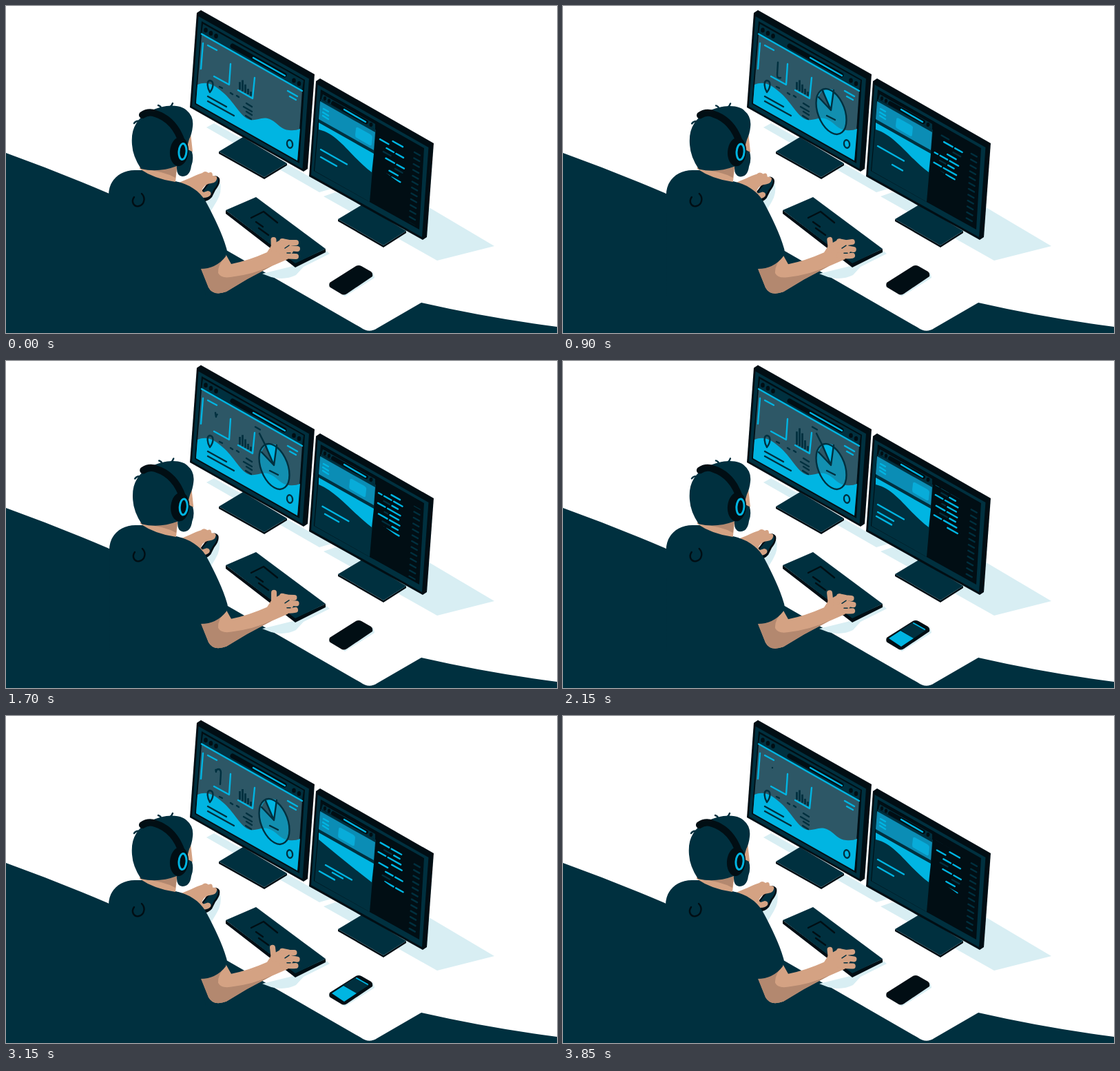
Animation, 800 px wide and 474 px high, one loop 3900 ms. Source, as an HTML page:

```html
<!DOCTYPE html>
<html lang="en">
<head>
<meta charset="utf-8">
<title>Developer at a desk</title>
<style>
html, body { margin: 0; width: 100%; height: 100%; overflow: hidden; background: #fff; }
svg { display: block; width: 800px; height: 474px; }
.navy { fill: #00303f; }
.black { fill: #010e14; }
.cyan { fill: #00b5e2; }
.shade { fill: #d8eef3; }
.skin { fill: #d4a283; }
.dim { fill: #b3886f; }
.ln { fill: none; stroke-width: 2.4; stroke-linecap: round; stroke-linejoin: round; }
.c { stroke: #00b5e2; }
.n { stroke: #00303f; }
.b { stroke: #010e14; }
.finger { fill: none; stroke: #d4a283; stroke-width: 8; stroke-linecap: round; }
</style>
</head>
<body>
<svg viewBox="0 0 800 474">
  <defs>
    <clipPath id="rowClip"><path d="M536 177L584 205 584 266 532 227Z"/></clipPath>
    <clipPath id="sideClip"><path d="M584 205L606 217 602 322 580 310Z"/></clipPath>
  </defs>

  <!-- shadows -->
  <path class="shade" d="M291 176L302 170 472 265 455 270Z"/>
  <path class="shade" d="M461 276L478 270 616 293 709 348 626 369Z"/>

  <!-- desk edge -->
  <path class="navy" d="M0 213Q75 240 150 272L320 354 515 466Q527 475 539 467L603 430Q700 452 800 465V474H0Z"/>

  <!-- stands -->
  <path class="black" d="M309 211L375 248 408 228V231L375 251 309 214Z"/>
  <path class="navy" d="M309 211L344 190 408 228 375 248Z"/>
  <path class="black" d="M482 309L548 347 581 326V329L548 350 482 312Z"/>
  <path class="navy" d="M482 309L517 288 581 326 548 347Z"/>

  <!-- left monitor -->
  <path class="black" d="M277 10L283 6 448 99 438 236 432 240 267 147Z"/>
  <path class="navy" d="M279.500 15L440 105.500 430.500 236 270 145.500Z"/>
  <path class="black" d="M284 22L434 107 426 228 274 142Z"/>
  <path class="navy" d="M286 26L432 108 430 122 284 40Z"/>
  <path fill="#2d5766" d="M284 41L430 123 423 224 276 141Z"/>
  <path class="cyan" d="M278 114C292 108 303 114 317 127C333 142 340 159 352 164C363 169 371 158 385 165C395 170 400 180 411 180Q420 181 427 178L423 224 276 141Z"/>
  <path class="ln c" d="M284 40.500L430 123"/>
  <g class="black">
    <ellipse cx="290" cy="35" rx="2.800" ry="3.600"/><ellipse cx="297.500" cy="39.500" rx="2.800" ry="3.600"/>
    <ellipse cx="305" cy="43.500" rx="2.800" ry="3.600"/><ellipse cx="418" cy="108" rx="2.800" ry="3.600"/>
    <ellipse cx="425.500" cy="112.500" rx="2.800" ry="3.600"/>
  </g>
  <path class="ln b" style="stroke-width:7" d="M329 58L404 100"/>
  <path class="ln c" d="M359 75L405 101M293 57L306 64M286 54L283 91M409 123L423 131M412 131L421 136M326 84L324 114 302 102M361 104L358 134 337 122"/>
  <path class="ln n" d="M293 131L320 146M293 138L331 159M310 117L314 119M326 126L329 128M335 130L338 132M349 141L357 146M345 146L357 153M349 153L357 158M348 159L356 164"/>
  <path class="ln n" d="M296 125C292 118 291 109 296 108C302 109 302 117 296 125Z"/>
  <ellipse class="ln n" cx="412" cy="200" rx="4" ry="5.800" transform="rotate(-10 412 200)"/>
  <path class="ln n" id="bars" style="stroke-width:2.800;stroke-linecap:butt"/>
  <path class="ln n" id="trace" pathLength="100" d="M304 75L305 81Q305 77 309 77 312 78 312 82L311 99Q311 104 313 104 316 105 317 103L317 98 320 106"/>
  <g id="pie">
    <g transform="translate(389.500 153) skewY(29)">
      <ellipse class="cyan" rx="22" ry="30.500" opacity=".6"/>
    </g>
    <path class="cyan" d="M389 151L378 123Q386 118 393 122Z"/>
    <path fill="#2d5766" d="M389 151L371 133Q373 126 377 123Z"/>
    <g transform="translate(389.500 153) skewY(29)">
      <ellipse class="ln n" rx="22" ry="30.500" vector-effect="non-scaling-stroke"/>
    </g>
    <path class="ln n" d="M393 122L389 151 377 123M389 151L371 132M383 159L395 165"/>
  </g>
  <path class="ln n" id="pointer"/>
  <path class="ln n" id="label"/>

  <!-- right monitor -->
  <path class="black" d="M450 109L456 105 621 199 611 335 605 339 440 247Z"/>
  <path class="navy" d="M452.500 114L613.500 205 604 335 443 245Z"/>
  <path class="black" d="M457 121L607 206 600 324 447 239Z"/>
  <path class="navy" d="M458 124L538 169 528 284 448 239Z"/>
  <path class="black" d="M458 122L539 168 538 180 457 135Z"/>
  <path class="navy" d="M460 128L536 171 536 179 458 135Z"/>
  <g class="black">
    <ellipse cx="463" cy="134" rx="2.200" ry="3"/><ellipse cx="469" cy="137.500" rx="2.200" ry="3"/>
    <ellipse cx="530" cy="172" rx="2.500" ry="3"/>
  </g>
  <path class="ln b" style="stroke-width:6" d="M475 141L523 168"/>
  <path class="ln c" d="M491 150L522 168"/>
  <path fill="#0b8db5" d="M456 138L536 183 534 209 454 164Z"/>
  <path class="ln c" d="M461 149L468 153M460 154L468 159M460 159L468 164"/>
  <path fill="#08acd9" id="card" d="M511 176L529 186Q532 188 532 190L531 200Q531 203 528 202L509 191Q507 190 507 187L508 178Q508 175 511 176Z"/>
  <path class="cyan" id="slope"/>
  <path class="ln c" id="copy"/>
  <g clip-path="url(#rowClip)">
    <path class="ln c" id="code"/>
    <path class="ln n" id="faint"/>
  </g>
  <path class="ln n" id="side" clip-path="url(#sideClip)"/>

  <!-- keyboard -->
  <path class="shade" d="M372 388L425 375 464 354 470 359 432 378 421 390Q405 398 385 393Z"/>
  <path class="black" d="M319 296L420 372 464 352V357L420 379 319 301Z"/>
  <path class="navy" d="M319 296L363 277 464 352 420 373Z"/>
  <path class="ln b" d="M356 307L374 298 394 314M363 313L373 320M367 322L381 332"/>

  <!-- phone -->
  <path class="shade" d="M492 421L535 394 533 386 485 415Z"/>
  <path class="black" d="M470 401L508 377Q512 375 516 377L530 385Q533 387 532 392L495 417Q490 420 486 417L471 408Q468 406 470 401Z"/>
  <g id="screen">
    <path class="navy" d="M490 390L508 379 527 390 509 402Z"/>
    <path class="cyan" d="M473 402L490 391 509 402 491 414Z"/>
    <path class="ln c" style="stroke-width:2" d="M509 380L525 389"/>
  </g>

  <!-- mouse hand -->
  <g id="mouse">
    <path class="shade" d="M288 283L311 255Q314 270 306 283L297 298Z"/>
    <path class="black" d="M282 281Q280 272 288 263L298 249Q305 243 310 250Q312 257 304 267L299 277Q292 285 282 283Z"/>
    <path class="navy" d="M284 278Q283 272 290 264L300 251Q305 247 308 251Q309 257 302 265L297 274Q291 280 284 278Z"/>
    <path class="skin" d="M246 258L268 249Q278 244 285 242Q289 238 294 242Q300 239 300 246Q308 246 306 251Q305 256 298 257Q289 258 286 264Q283 268 287 270L293 268Q299 269 297 274Q294 278 286 278L279 285Z"/>
  </g>

  <!-- typing arm -->
  <g id="arm">
    <path class="skin" d="M283 380L318 358 327 374Q352 369 379 357L386 346 402 337 413 343 417 356 409 367 386 377 350 396 320 414Q301 421 294 408Z"/>
    <path class="dim" d="M283 381Q302 379 320 361Q307 375 308 387Q312 395 326 393Q360 389 387 376L350 396 320 414Q301 421 294 408Z"/>
    <path class="finger" id="index"/>
    <path class="finger" id="middle"/>
    <path class="finger" id="ring"/>
    <path class="finger" id="little"/>
    <path class="ln n" style="stroke-width:1.500" d="M405 351L411 347M408 358L413 358"/>
  </g>

  <!-- person -->
  <g id="person">
    <path class="navy" d="M149 274C149 252 166 238 187 238L200 238 246 254C269 259 284 271 292 287C302 306 314 330 320 351Q322 356 319 363Q305 381 282 381L290 420 150 420Z"/>
    <path class="skin" d="M194 234L249 228 246 255Q216 251 194 236Z"/>
    <path class="dim" d="M203 238Q228 240 248 232L246 249Q228 239 203 238Z"/>
    <path class="ln b" d="M186 277C181 284 186 292 193 290C201 288 203 278 197 272"/>
    <g id="head">
      <path class="skin" d="M258 187L268 184 271 211 262 215Z"/>
      <path class="navy" d="M196 236Q184 218 183 201C181 178 190 163 207 154C230 141 254 143 262 151Q273 160 271 175Q270 185 266 193L262 207 270 211Q273 222 269 232Q267 247 256 247Q247 246 248 232Q222 242 196 236Z"/>
      <path class="ln n" d="M186 170Q189 166 193 167M221 144Q225 145 226 150M231 148Q239 149 242 141"/>
      <path class="ln b" style="stroke-width:10" d="M198 158Q207 152 217 156C239 163 250 180 256 199"/>
      <ellipse class="black" cx="251.500" cy="211" rx="13.500" ry="21" transform="rotate(5 251.500 211)"/>
      <ellipse class="ln c" style="stroke-width:3" cx="256.500" cy="211" rx="5.500" ry="11.500" transform="rotate(4 256.500 211)"/>
    </g>
  </g>
</svg>
<script>
const LOOP = 3900, HALF = LOOP / 2, TILT = 0.564;
const $ = id => document.getElementById(id);
const draw = (id, d) => $(id).setAttribute('d', d);
const place = (id, x, y) => $(id).setAttribute('transform', `translate(${x} ${y})`);
const show = (id, on) => { $(id).style.display = on ? '' : 'none'; };
const seg = (x, y, len) => `M${x} ${y}l${len} ${len * TILT}`;
const mix = (a, b, k) => a + (b - a) * k;

// Value at time t from a small list of [time, value] stops.
function at(t, stops, ease = k => k) {
  if (t <= stops[0][0]) return stops[0][1];
  for (let i = 1; i < stops.length; i++) {
    const [t0, a] = stops[i - 1], [t1, b] = stops[i];
    if (t <= t1) return mix(a, b, ease((t - t0) / (t1 - t0)));
  }
  return stops[stops.length - 1][1];
}
const smooth = k => k * k * (3 - 2 * k);

// Each row: dashes are code, dots are faint code, two pixels per character.
const ROWS = [
  ' -------', '      ------ ------', '    ......', '      ------- ------', '             ......',
  '         -------', '--- ------ -------', '    ..... -----', '------ ----------', '     ... -------',
  ' ------- --------', '    ...... -----', '------ ----------', '          --------'
];
const PITCH = 7.3, CODE = ROWS.length * PITCH;

function drawCode(t) {
  const out = { '-': '', '.': '' };
  ROWS.forEach((row, i) => {
    const y = 172 + ((i * PITCH + 20 - CODE * t / LOOP) % CODE + CODE) % CODE;
    for (const m of row.matchAll(/-+|\.+/g)) {
      const x = m.index * 2;
      out[m[0][0]] += seg(541 + x - (y - 192) * 0.07, y + x * TILT, m[0].length * 2 - 1.5);
    }
  });
  draw('code', out['-']);
  draw('faint', out['.']);
  let side = '';
  for (let i = -1; i < 14; i++) {
    const y = 212 + (i - t / LOOP * 12 % 1) * 8.5;
    side += seg(593 - (y - 212) * 0.075, y, 8);
  }
  draw('side', side);
}

function drawDashboard(t) {
  const p = t % HALF, q = Math.min(t, LOOP - t);
  const grow = at(t, [[1650, 0], [2150, 1], [2500, 1], [2800, 0.5], [3200, 0.15], [3500, 0]], smooth);
  const low = [11, 16, 12, 8, 6], high = [19, 26, 21, 13, 7];
  draw('bars', low.map((h, i) => {
    const x = 339.5 + i * 4;
    return `M${x} ${121 + (x - 339) * TILT}v${-mix(h, high[i], grow)}`;
  }).join(''));

  const head = at(p, [[450, 100], [550, 86], [850, 35], [1200, 5], [1300, 0]]);
  const tail = at(p, [[700, 100], [850, 77], [1200, 60], [1900, 0]]);
  const trace = $('trace');
  show('trace', p > 450 && p < 1925);
  trace.style.strokeDasharray = `${Math.max(0.1, tail - head)} 300`;
  trace.style.strokeDashoffset = -head;

  const size = at(q, [[50, 0], [500, 1]], smooth);
  show('pie', size > 0);
  $('pie').setAttribute('transform', `translate(389.5 153) scale(${size}) translate(-389.5 -153)`);
  const reach = at(q, [[800, 0], [1180, 1]], smooth);
  show('pointer', reach > 0);
  draw('pointer', `M378 125L${378 - 10 * reach} ${125 - 20 * reach}`);
  const label = at(q, [[1180, 0], [1500, 1]], smooth);
  show('label', label > 0);
  draw('label', seg(369 - 7 * label, 99.5 - 4 * label, 7 * label));
}

function drawPage(t) {
  const p = t % HALF;
  const pos = (a, b, c) => at(p, [[280, a], [480, b], [900, b], [1130, c], [1550, c], [1800, a]], smooth);
  const slide = pos(0, -24, -25);
  place('card', slide, slide * TILT);
  const bend = pos(1, 0.85, 0);
  draw('slope', `M454 169L534 214 531 241C${mix(505, 501, bend)} ${mix(221, 219, bend)} ${mix(480, 484, bend)} ${mix(201, 186, bend)} 454 179Z`);
  draw('copy', seg(457 + pos(0, 0, 7), pos(208, 203, 216), 38) +
    seg(pos(457, 478, 474), pos(219, 230, 227), pos(23, 15, 15)) +
    (t > 1900 && t < 3400 ? seg(455, 225, 22) : ''));
}

function drawPerson(t) {
  const lean = Math.max(0, Math.sin(Math.PI * t / 2900));
  place('person', lean, 0);
  place('head', lean * 0.3, lean * 0.5);
  const dx = at(t, [[0, 0], [550, -4.5], [1200, -2.5], [2150, -1], [2800, -1], [3150, 0]], smooth);
  const dy = at(t, [[0, 0], [550, 0], [1200, 2.5], [2150, 4], [2800, 4], [3150, 2.5], [3600, 0]], smooth);
  place('mouse', dx, dy);

  const tap = (n, shift) => Math.sin(2 * Math.PI * (n * t / LOOP + shift));
  place('arm', 0, 0.3 * tap(6, 0));
  draw('index', `M389 353L${388.5 + 1.8 * tap(7, 0)} ${337.5 + 1.5 * tap(8, 0.3)}`);
  draw('middle', `M401 341L411 343 ${421 - 2.5 * Math.abs(tap(4, 0))} ${343 + 1.5 * tap(8, 0)}`);
  draw('ring', `M402 349L412 351 ${423 - 1.5 * Math.abs(tap(5, 0))} ${352 + 1.2 * tap(7, 0.5)}`);
  draw('little', `M401 361Q411 363 ${421 - Math.abs(tap(3, 0))} ${362 + tap(6, 0.2)}`);
}

function frame(now) {
  const t = Math.floor(now % LOOP / 50) * 50;
  drawDashboard(t);
  drawPage(t);
  drawCode(t);
  drawPerson(t);
  $('screen').style.opacity = at(t, [[1800, 0], [2000, 1], [3400, 1], [3600, 0]]);
  requestAnimationFrame(frame);
}
frame(performance.now());
</script>
</body>
</html>
```
